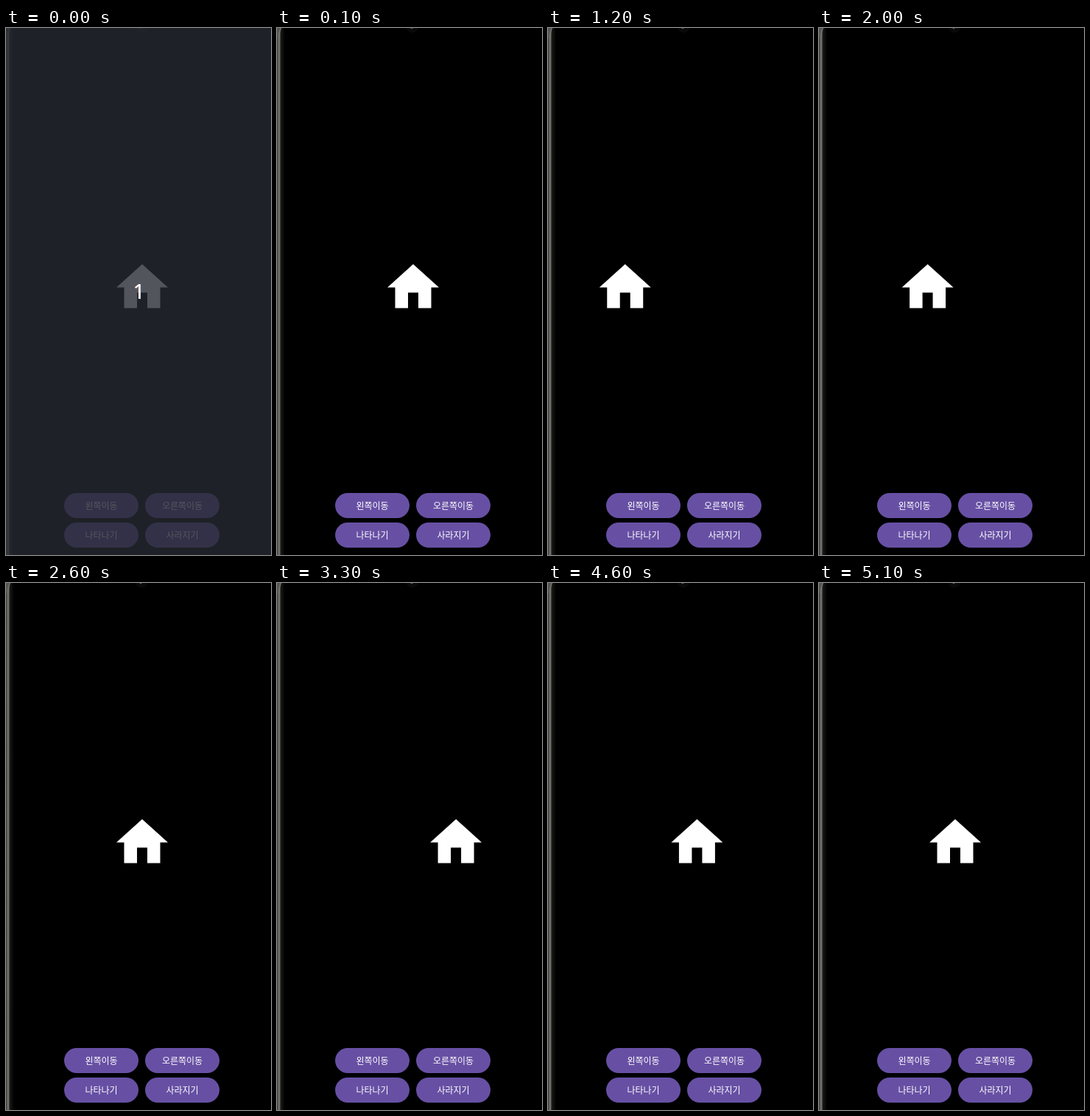
Write an HTML page that moves like this. It is 360 px wide and 714 px high and loops after 5.3 s.

```html
<!DOCTYPE html>
<html lang="ko">
<head>
<meta charset="utf-8">
<style>
  html, body { margin: 0; width: 100%; height: 100%; overflow: hidden; background: #000; }
  svg { display: block; }
  text { font: 500 12px "Noto Sans CJK KR", "Noto Sans CJK", sans-serif; fill: #fff; text-anchor: middle; }
  #count text { font: 400 28px "Open Sans", sans-serif; }
</style>
</head>
<body>
<svg width="360" height="714" viewBox="0 0 360 714">
  <defs>
    <linearGradient id="edge">
      <stop offset="0" stop-color="#3c3c3a"/>
      <stop offset=".12" stop-color="#50504d"/>
      <stop offset=".2" stop-color="#777772"/>
      <stop offset=".34" stop-color="#6a6a66"/>
      <stop offset=".46" stop-color="#1a1a19"/>
      <stop offset="1" stop-color="#000"/>
    </linearGradient>
    <clipPath id="pills"></clipPath>
  </defs>
  <rect width="360" height="714"/>
  <!-- phone rim and camera -->
  <rect width="11" height="714" fill="url(#edge)"/>
  <path d="M0 0H5Q2 5 1.5 14H0Z" fill="#555552"/>
  <path d="M5.5 0Q3 5 2.7 14" fill="none" stroke="#777772" stroke-width="1.3"/>
  <circle cx="184" cy="-2" r="8.5" fill="#090909"/>
  <circle cx="183" cy="-.5" r="1.8" fill="#555"/>

  <path id="house" fill="#fff" d="M10 20v-6h4v6h5v-8h3L12 3 2 12h3v8z"/>
  <g id="buttons"></g>
  <circle id="ripple" cy="647" fill="#fff" clip-path="url(#pills)"/>
  <g id="count">
    <rect width="360" height="714" fill="#262a32" fill-opacity=".795"/>
    <text x="180.3" y="367" style="fill:#f3b884">1</text>
    <text x="181.3" y="367" style="fill:#9daaf0">1</text>
    <text x="180.8" y="367">1</text>
  </g>
</svg>
<script>
const LOOP = 5300, STEP = 100;
const byId = id => document.getElementById(id);
const mix = (a, b, p) => a + (b - a) * p;
const clamp = v => Math.min(1, Math.max(0, v));

const pill = (x, y) => `<rect x="${x}" y="${y}" width="101" height="34" rx="17" fill="#6750a4"/>`;
const labels = [['왼쪽이동', 79, 630], ['오른쪽이동', 189, 630], ['나타나기', 79, 670], ['사라지기', 189, 670]];
byId('buttons').innerHTML = labels.map(([label, x, y]) =>
  pill(x, y) + `<text x="${x + 50.5}" y="${y + 22}">${label}</text>`).join('');
byId('pills').innerHTML = pill(79, 630) + pill(189, 630);

// Each move: start time, house offset before and after, centre of the pressed button
const moves = [
  [487, 0, -85, 129.5],
  [1625, -85, 0, 129.5],
  [2860, 0, 84.5, 239.5],
  [4085, 84.5, 0, 239.5]
];

// cubic-bezier(.4, 0, .2, 1)
function ease(p) {
  p = clamp(p);
  let lo = 0, hi = 1;
  for (let i = 0; i < 24; i++) {
    const s = (lo + hi) / 2, r = 1 - s;
    if (1.2 * r * r * s + .6 * r * s * s + s ** 3 < p) lo = s; else hi = s;
  }
  return lo * lo * (3 - 2 * lo);
}

function draw(now) {
  const t = Math.floor(now % LOOP / STEP) * STEP;
  let offset = 0, alpha = 0;
  for (const [start, from, to, centre] of moves) {
    if (t >= start) offset = mix(from, to, ease((t - start) / 1000));
    // the press begins shortly before the house moves
    const age = t - start + 60;
    if (age < 0 || age > 375) continue;
    const grow = ease((age + 29) / 225);
    alpha = .13 * clamp(age / 60) * clamp((375 - age) / 150);
    byId('ripple').setAttribute('cx', mix(centre - 12, centre, grow));
    byId('ripple').setAttribute('r', mix(30, 62, grow));
  }
  byId('house').setAttribute('transform', `translate(${143 + offset} 309.5) scale(3.5)`);
  byId('ripple').setAttribute('fill-opacity', alpha);
  byId('count').style.display = t < 100 ? '' : 'none';
}

const origin = performance.now();
function tick() {
  draw(performance.now() - origin);
  requestAnimationFrame(tick);
}
tick();
</script>
</body>
</html>
```
